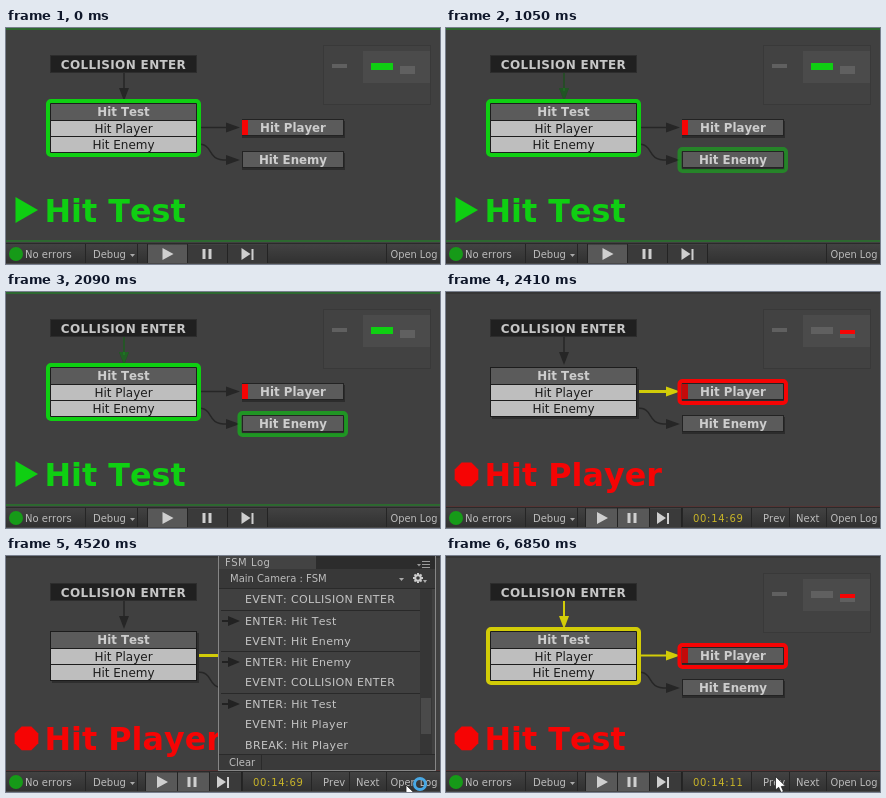
An HTML page with a canvas for the animation above (8 s loop, 434 by 236 pixels).

```html
<!DOCTYPE html>
<html lang="en">
<head>
<meta charset="utf-8">
<title>State machine debugger</title>
<style>
html, body { margin: 0; width: 100%; height: 100%; overflow: hidden; background: #404040; }
canvas { display: block; width: 434px; height: 236px; }
</style>
</head>
<body>
<canvas id="stage" width="434" height="236"></canvas>
<script>
const W = 434, H = 236, LOOP = 8000;
const GREEN = '#0fcf12', RED = '#f60404', YELLOW = '#d2cc08', DARK = '#262626';
const LABEL = '#cdcdcd', INK = '#bcbcbc';
const screen = document.getElementById('stage').getContext('2d');
const layer = document.createElement('canvas');
layer.width = W;
layer.height = H;
const layerCtx = layer.getContext('2d');
let g = screen;

const STATES = [[0, 'test'], [70, 'enemy'], [810, 'test'], [1200, 'enemy'], [1940, 'test'], [2410, 'player']];
const NAMES = { test: 'Hit Test', player: 'Hit Player', enemy: 'Hit Enemy' };
const BREAK_AT = 2410, LOG_AT = 4360, STEP_BACK_AT = 6690;
const TO_TEST = [810, 1940], TO_ENEMY = [70, 1200];

function rect(x, y, w, h, color) {
  g.fillStyle = color;
  g.fillRect(x, y, w, h);
}

function text(str, x, y, size, color, { bold = false, center = false, spacing = 0 } = {}) {
  g.font = `${bold ? 'bold ' : ''}${size}px "DejaVu Sans", sans-serif`;
  g.fontKerning = 'none';
  g.textAlign = center ? 'center' : 'left';
  g.letterSpacing = spacing + 'px';
  g.fillStyle = color;
  g.fillText(str, x, y);
}

function poly(points, color) {
  g.beginPath();
  points.forEach(([x, y]) => g.lineTo(x, y));
  g.closePath();
  g.fillStyle = color;
  g.fill();
}

function withAlpha(alpha, draw) {
  if (alpha <= 0) return;
  g.save();
  g.globalAlpha = alpha;
  draw();
  g.restore();
}

function outline(x, y, w, h, color) {
  g.strokeStyle = color;
  g.lineWidth = 4;
  g.beginPath();
  g.roundRect(x + 2, y + 2, w - 4, h - 4, 3);
  g.stroke();
}

// Remaining highlight, 1 to 0 in seven steps after the latest start.
function fade(t, starts) {
  const start = starts.filter(s => s <= t).pop();
  return start === undefined ? 0 : Math.max(0, 1 - Math.floor((t - start) / 77 + 0.1) / 7);
}

function startLink(color, width = 1.5) {
  rect(118 - width / 2, 45, width, 18, color);
  poly([[113, 60], [123, 60], [118, 73]], color);
}

function playerLink(color, width = 1.5) {
  rect(191, 99.5 - width / 2, 31, width, color);
  poly([[220, 94.5], [234, 99.5], [220, 104.5]], color);
}

function enemyLink(color, width = 1.5) {
  g.strokeStyle = color;
  g.lineWidth = width;
  g.beginPath();
  g.moveTo(191, 116);
  g.bezierCurveTo(210, 116, 198, 132, 221, 132);
  g.stroke();
  poly([[220, 127], [234, 132], [220, 137]], color);
}

function node(x, y, w, label) {
  rect(x, y + 2, w + 1, 17, '#2c2c2c');
  rect(x, y, w, 17, '#232323');
  rect(x + 1, y + 1, w - 2, 15, '#5b5b5b');
  text(label, x + w / 2, y + 13, 11.8, LABEL, { bold: true, center: true });
}

function testNode() {
  rect(46, 77, 147, 50, '#2e2e2e');
  rect(44, 75, 147, 50, '#1c1c1c');
  rect(45, 76, 145, 16, '#5b5b5b');
  text(NAMES.test, 117.5, 88, 11.8, LABEL, { bold: true, center: true });
  [['Hit Player', 93], ['Hit Enemy', 109]].forEach(([label, y]) => {
    rect(45, y, 145, 15, '#bebebe');
    text(label, 117.5, y + 12, 12, '#1c1c1c', { center: true });
  });
}

function minimap(active, color) {
  rect(317, 17, 108, 60, '#393939');
  rect(318, 18, 106, 58, '#424242');
  rect(357, 23, 67, 32, '#4b4b4b');
  rect(326, 36, 15, 4, '#606060');
  const bars = { test: [365, 35, 22, 7], player: [394, 38, 15, 4], enemy: [394, 42, 15, 4] };
  for (const key in bars) rect(...bars[key], '#606060');
  rect(...bars[active], color);
}

function title(label, paused) {
  if (paused) {
    const corners = Array.from({ length: 8 }, (_, i) => {
      const a = (i + 0.5) * Math.PI / 4;
      return [20.5 + 12.8 * Math.cos(a), 182.3 + 12.8 * Math.sin(a)];
    });
    poly(corners, RED);
  } else {
    poly([[9.5, 169], [32, 182], [9.5, 195]], GREEN);
  }
  text(label, 38.5, 194, 31.8, paused ? RED : GREEN, { bold: true });
}

function button(x, w, pressed) {
  rect(x, 217, w, 18, pressed ? '#585858' : '#3a3a3a');
  rect(x + w, 216, 1, 20, '#232323');
}

function toolbar(paused, clock) {
  const shade = g.createLinearGradient(0, 215, 0, H);
  shade.addColorStop(0, '#434343');
  shade.addColorStop(1, '#303030');
  rect(0, 215, W, 21, shade);
  rect(0, 215, W, 1, '#2a2a2a');
  g.fillStyle = '#169a18';
  g.beginPath();
  g.arc(10, 226, 7, 0, Math.PI * 2);
  g.fill();
  text('No errors', 19, 230, 10, INK);
  [79, 131].forEach(x => rect(x, 216, 1, 20, '#252525'));
  text('Debug', 87, 230, 10, INK);
  poly([[124, 226], [129, 226], [126.5, 229]], '#aaa');
  const left = paused ? 140 : 142, w = paused ? 31 : 39, gap = paused ? 30.5 : 40;
  rect(left - 1, 216, 1, 20, '#232323');
  [0, 1, 2].forEach(i => button(left + i * (w + 1), w, i === 0 || (i === 1 && paused)));
  const x = paused ? 156 : 161.5;
  const icon = '#cfcfcf';
  poly([[x - 5, 220], [x + 6, 226], [x - 5, 232]], icon);
  rect(x + gap - 5, 221, 3, 10, icon);
  rect(x + gap + 1, 221, 3, 10, icon);
  poly([[x + 2 * gap - 6, 220], [x + 2 * gap + 3, 226], [x + 2 * gap - 6, 232]], icon);
  rect(x + 2 * gap + 4, 221, 2, 11, icon);
  if (paused) {
    [236, 305, 343].forEach(sx => rect(sx, 216, 1, 20, '#252525'));
    text(clock, 247, 230, 10, '#c8b428', { spacing: 0.7 });
    text('Prev', 317, 230, 10, INK);
    text('Next', 350, 230, 10, INK);
  }
  rect(380, 216, 1, 20, '#252525');
  text('Open Log', 384.5, 230, 9.8, INK);
  rect(0, 235, W, 1, '#484848');
}

function graph(t, view) {
  const paused = t >= BREAK_AT, back = view === 'back';
  const active = STATES.filter(s => s[0] <= t).pop()[1];
  rect(0, 0, W, H, '#404040');
  rect(0, 0, W, 2, paused ? '#363636' : '#2d6830');
  if (paused) rect(0, 214, W, 1, '#543434');
  else rect(0, 212, W, 2, '#2d6830');
  minimap(active, paused ? RED : GREEN);

  startLink(back ? YELLOW : DARK, back ? 2 : 1.5);
  playerLink(paused ? YELLOW : DARK, back ? 2 : paused ? 3 : 1.5);
  enemyLink(DARK);
  if (!paused) {
    withAlpha(fade(t, TO_TEST) * 0.7, () => startLink('#1c9a22'));
    withAlpha(fade(t, TO_ENEMY), () => enemyLink('#16b81c', 3));
  }

  rect(44, 27, 147, 18, '#2d2d2d');
  rect(45, 28, 145, 16, '#202020');
  text('COLLISION ENTER', 117.5, 41, 12, '#c6c6c6', { bold: true, center: true, spacing: 0.35 });
  testNode();
  node(236, 91, 102, NAMES.player);
  node(236, 123, 102, NAMES.enemy);
  rect(236, 92, 6, 15, paused ? '#c40a0a' : RED);

  const frames = { test: [40, 71, 155, 58], player: [231.5, 87, 110.5, 26], enemy: [231.5, 119, 110.5, 26] };
  if (!paused) {
    withAlpha(fade(t, TO_ENEMY), () => outline(...frames.test, '#14b81a'));
    withAlpha(fade(t, TO_TEST), () => outline(...frames.enemy, '#14b81a'));
  }
  if (back) outline(...frames.test, YELLOW);
  outline(...frames[active], paused ? RED : GREEN);
  title(NAMES[back ? 'test' : active], paused);
  toolbar(paused, back ? '00:14:11' : '00:14:69');
}

function logWindow() {
  rect(212, 0, 218, 215, '#868686');
  rect(213, 0, 216, 214, '#404040');
  rect(213, 0, 216, 13, '#2c2c2c');
  rect(213, 0, 97, 13, '#434343');
  text('FSM Log', 219, 9.5, 10, INK, { spacing: 0.5 });
  poly([[411, 8], [415, 8], [413, 10.5]], '#999');
  [5, 8, 11].forEach(y => rect(416, y, 8, 1, '#999'));
  rect(213, 13, 216, 19, '#383838');
  text('Main Camera : FSM', 224, 26, 10, INK);
  poly([[393, 22], [398, 22], [395.5, 25]], '#aaa');

  g.strokeStyle = '#ccc';
  g.lineWidth = 2;
  g.beginPath();
  g.arc(412, 22, 2.8, 0, Math.PI * 2);
  for (let i = 0; i < 8; i++) {
    const c = Math.cos(i * Math.PI / 4), s = Math.sin(i * Math.PI / 4);
    g.moveTo(412 + 3 * c, 22 + 3 * s);
    g.lineTo(412 + 5 * c, 22 + 5 * s);
  }
  g.stroke();
  poly([[417, 24], [421, 24], [419, 27]], '#aaa');

  rect(213, 32, 216, 1, '#2a2a2a');
  rect(414, 33, 12, 165, '#363636');
  rect(415, 142, 10, 36, '#4a4a4a');
  const rows = [
    'EVENT: COLLISION ENTER', 'ENTER: Hit Test', 'EVENT: Hit Enemy', 'ENTER: Hit Enemy',
    'EVENT: COLLISION ENTER', 'ENTER: Hit Test', 'EVENT: Hit Player', 'BREAK: Hit Player'
  ];
  rows.forEach((label, i) => {
    const entering = label.startsWith('ENTER');
    const y = Math.round(47 + i * 20.8) + (entering ? 1 : 0);
    text(label, 239, y, 11, '#c4c4c4', { spacing: 0.35 });
    if (entering) {
      rect(215, y - 15, 199, 1, '#292929');
      rect(216, y - 5, 9, 2, '#222');
      poly([[222, y - 9], [234, y - 4], [222, y + 1]], '#222');
    }
  });
  rect(213, 198, 216, 1, '#2a2a2a');
  rect(213, 199, 216, 15, '#3a3a3a');
  text('Clear', 223, 210, 10, INK);
  rect(255, 199, 1, 15, '#2a2a2a');
}

function cursor(t) {
  if (t < 3670) return;
  const tick = (start, count) => Math.min(1, Math.max(0, Math.floor((t - start) / 76.5 + 0.1) / count));
  const rise = tick(3670, 3);
  const p = tick(5773, 9), slide = p * p * (3 - 2 * p);
  const x = 398 + 2 * rise - 70.5 * slide;
  const y = 234 - 5 * rise - 8.5 * slide;
  const shape = [[0, 0], [0, 13.5], [3.2, 10.8], [5.5, 16], [8, 15], [5.8, 10], [10, 9.6]];
  poly(shape.map(([dx, dy]) => [x + dx, y + dy]), '#fff');
  g.strokeStyle = '#222';
  g.lineWidth = 0.8;
  g.stroke();
  if (t >= 4130 && t < 5850) {
    g.strokeStyle = '#48a8e4';
    g.lineWidth = 3;
    g.beginPath();
    g.arc(414, 228, 5.5, 0, Math.PI * 2);
    g.stroke();
  }
}

function scene(t, view) {
  graph(t, view);
  if (view === 'log') logWindow();
  cursor(t);
}

function blend(t, view, start) {
  const amount = Math.min(1, (Math.floor((t - start) / 80) + 1) / 3);
  g = layerCtx;
  scene(t, view);
  g = screen;
  withAlpha(amount, () => g.drawImage(layer, 0, 0));
}

function render(t) {
  scene(t, t >= STEP_BACK_AT ? 'log' : 'live');
  if (t >= STEP_BACK_AT) blend(t, 'back', STEP_BACK_AT);
  else if (t >= LOG_AT) blend(t, 'log', LOG_AT);
}

const began = performance.now();
function loop() {
  render((performance.now() - began) % LOOP);
  requestAnimationFrame(loop);
}
loop();
</script>
</body>
</html>
```
